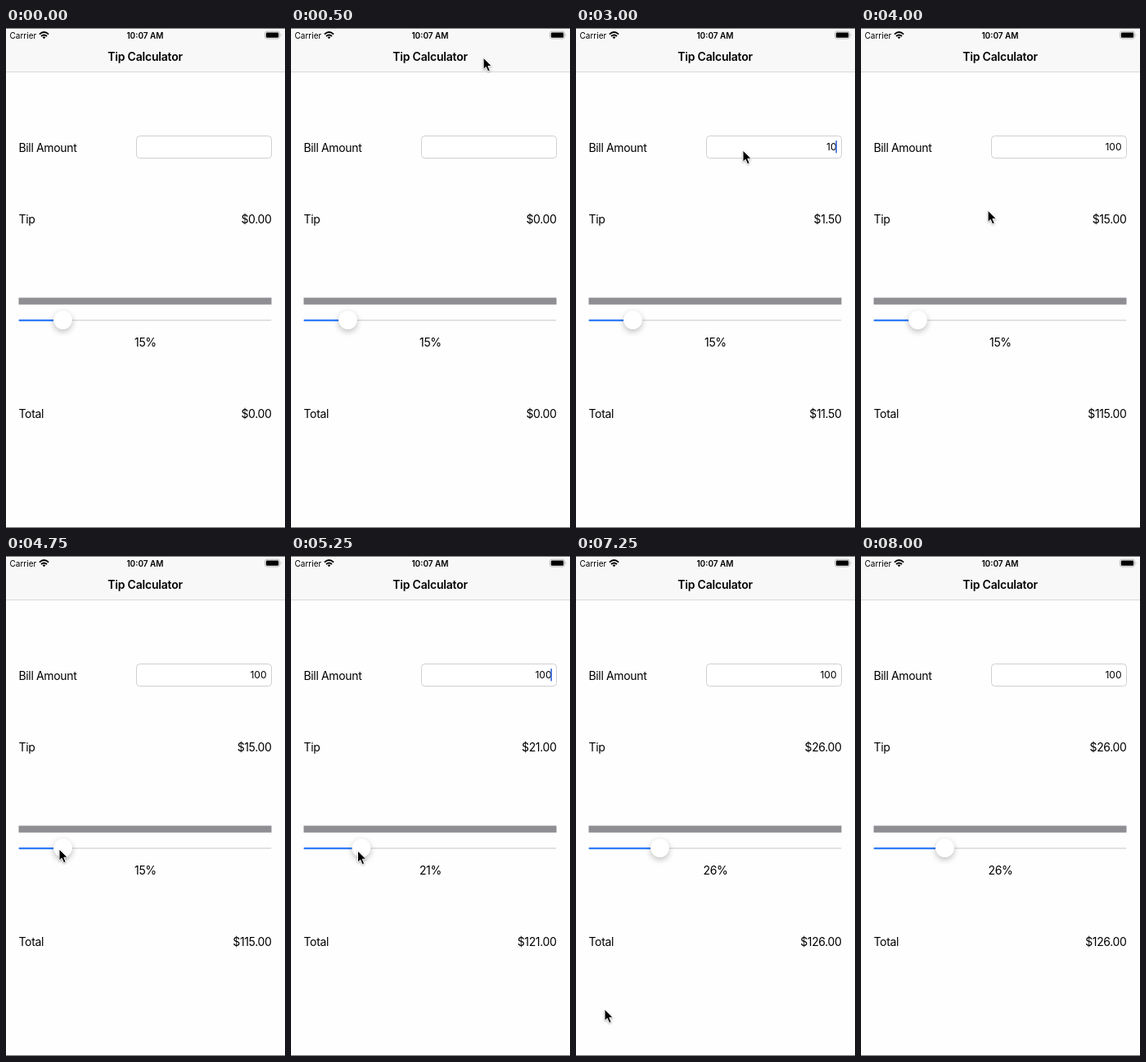
An HTML page that plays this animation: 341x609 px, repeating every 8.25 s.

```html
<!DOCTYPE html>
<html lang="en">
<head>
<meta charset="utf-8">
<title>Tip Calculator</title>
<style>
  html, body { margin: 0; width: 100%; height: 100%; overflow: hidden; background: #fefefe; }
  svg { display: block; width: 341px; height: 609px; }
  text { font: 14px Inter, Roboto, sans-serif; letter-spacing: -.35px; fill: #000; }
  .status { font-size: 10px; letter-spacing: 0; }
  .title { font-weight: 600; letter-spacing: -.2px; }
  .bold { font-weight: 600; }
  .field { font-size: 12px; letter-spacing: 0; }
  .end { text-anchor: end; }
  .mid { text-anchor: middle; }
  #thumb { filter: drop-shadow(0 3px 3.5px rgba(0, 0, 0, .24)); }
  #cursor { filter: drop-shadow(0 1px 1px rgba(0, 0, 0, .3)); }
</style>
</head>
<body>
<svg viewBox="0 0 341 609">
  <rect width="341" height="609" fill="#fefefe"/>
  <rect width="341" height="53" fill="#f8f8f8"/>
  <rect y="53" width="341" height="1" fill="#d8d8d8"/>
  <rect width="341" height="1" fill="#777"/>
  <rect y="608" width="341" height="1" fill="#777"/>

  <text class="status" x="4.5" y="13">Carrier</text>
  <g fill="none" stroke="#000" stroke-width="1.9">
    <path d="M40.9 7.6Q46.5 2.6 52.1 7.6M43 10Q46.5 6.9 50 10"/>
    <path d="M44.6 11.2Q46.5 9.8 48.4 11.2L46.5 13.2Z" fill="#000" stroke="none"/>
  </g>
  <text class="status bold mid" x="170" y="13">10:07 AM</text>
  <rect x="316.5" y="4.2" width="18" height="8.8" rx="2.4" fill="none" stroke="#aaa" stroke-width=".8"/>
  <rect x="317.8" y="5.4" width="15.4" height="6.4" rx="1.4"/>
  <path d="M335.8 7Q337.4 8.6 335.8 10.2Z" fill="#aaa"/>
  <text class="title mid" x="170" y="40.4">Tip Calculator</text>

  <text x="15.5" y="151">Bill Amount</text>
  <rect x="159.5" y="131.5" width="165" height="27" rx="4" fill="#fff" stroke="#cfcfcf"/>
  <text id="bill" class="field end" x="318.5" y="149"></text>
  <rect id="caret" x="317.3" y="137" width="1.7" height="15.5" rx=".8" fill="#3f6fe0"/>

  <text x="15.5" y="238.4">Tip</text>
  <text id="tip" class="end" x="324.5" y="238.4"></text>

  <rect x="15.5" y="328.5" width="309" height="8.3" fill="#8e8e93"/>
  <rect x="15.5" y="355" width="309" height="2" rx="1" fill="#e2e2e3"/>
  <rect id="fill" x="15.5" y="355" height="2.3" rx="1" fill="#2f7cf6"/>
  <circle id="thumb" cy="355.5" r="11.5" fill="#fff" stroke="#000" stroke-opacity=".05" stroke-width=".5"/>
  <text id="rate" class="mid" x="170.4" y="388"></text>

  <text x="15.5" y="475.2">Total</text>
  <text id="total" class="end" x="324.5" y="475.2"></text>

  <path id="cursor" d="M0 0V14.2L3.2 11.2L5.6 16.7L8.2 15.6L5.8 10.2H10.3Z" stroke="#fff" stroke-width="1" stroke-linejoin="round"/>
</svg>
<script>
  const LOOP = 8250, TICK = 250;
  const FOCUS = 1750, IDLE = 3750, GRAB = 4750, DROP = 5750;
  const KEYS = [2250, 3000, 3250];
  const FIELD = [204, 149], THUMB = [65, 357], DROPPED = [98, 361], PAUSE = [67, 431], REST = [35, 552];
  const $ = id => document.getElementById(id);

  const mix = (a, b, k) => a + (b - a) * k;
  const money = n => '$' + n.toFixed(2);

  // Eased progress from time a to time b.
  function glide(t, a, b) {
    const k = Math.min(1, Math.max(0, (t - a) / (b - a)));
    return k * k * (3 - 2 * k);
  }

  function cursorAt(t) {
    let p = [252, -25];
    const go = (to, a, b) => { p = p.map((v, i) => mix(v, to[i], glide(t, a, b))); };
    go(FIELD, 0, 1250);
    go(THUMB, IDLE - TICK, GRAB);
    go(DROPPED, GRAB, DROP);
    go(PAUSE, DROP, 6250);
    go(REST, 6250, 6750);
    return p;
  }

  // Solid while typing, then blinking once a second until the slider is released.
  const caretOn = t => t >= FOCUS && t < DROP && (t < IDLE || (t - IDLE) % 1000 >= 500);

  function draw(ms) {
    const t = Math.floor(ms % LOOP / TICK) * TICK;
    const bill = '100'.slice(0, KEYS.filter(k => k <= t).length);
    const slide = mix(15, 26, glide(t, GRAB, DROP));
    const rate = Math.round(slide), tip = bill * rate / 100;
    const x = 69.5 + (slide - 15) * 3;

    $('bill').textContent = bill;
    $('tip').textContent = money(tip);
    $('total').textContent = money(+bill + tip);
    $('rate').textContent = rate + '%';
    $('thumb').setAttribute('cx', x);
    $('fill').setAttribute('width', x - 15.5);
    $('caret').style.opacity = +caretOn(t);
    $('cursor').style.display = t >= TICK && t < 7500 ? '' : 'none';
    $('cursor').setAttribute('transform', `translate(${cursorAt(t)})`);
  }

  const start = performance.now();
  function frame() {
    draw(performance.now() - start);
    requestAnimationFrame(frame);
  }
  frame();
</script>
</body>
</html>
```
